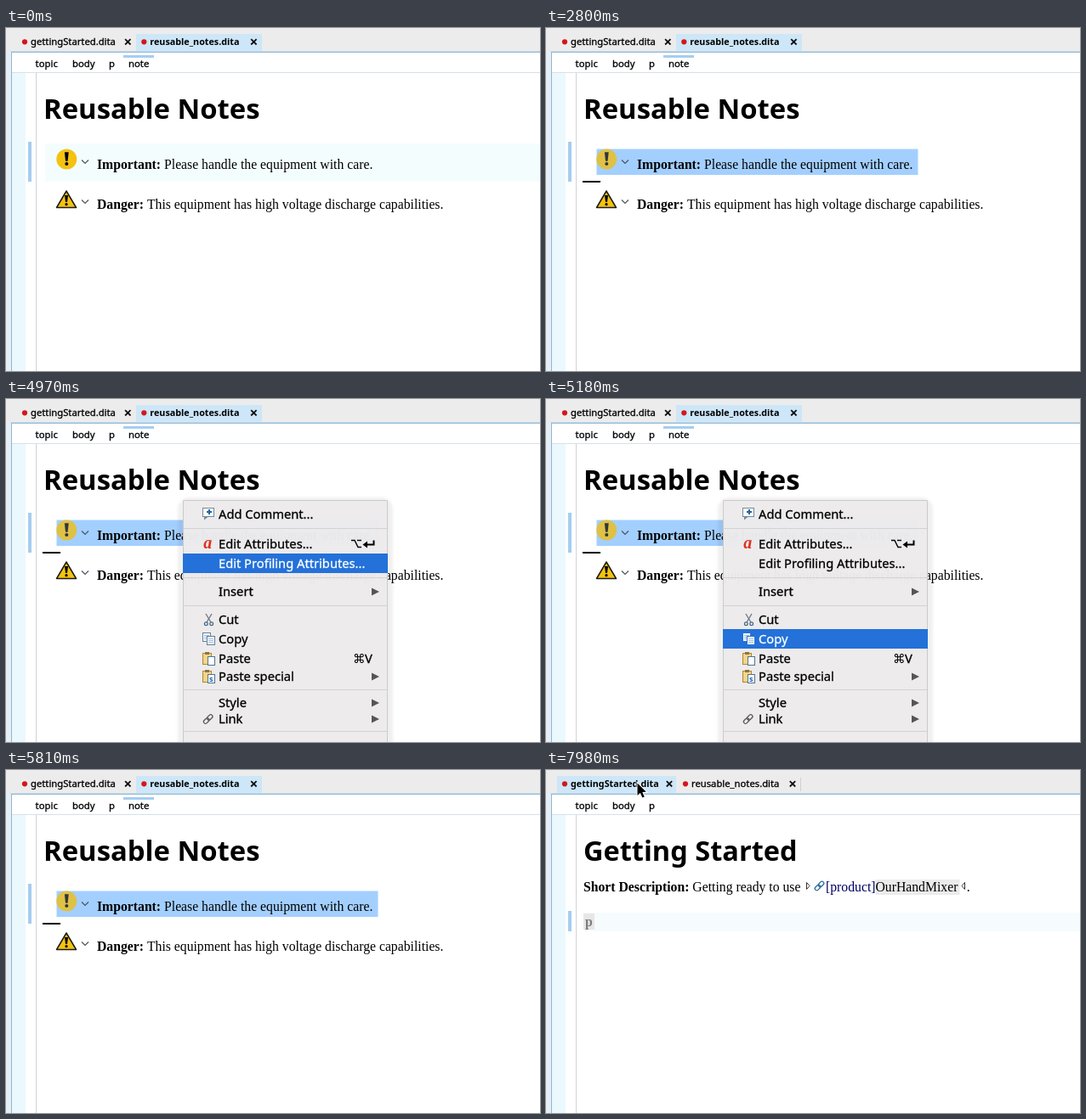
An HTML page with a canvas that plays this animation: 628 px wide and 404 px high, repeating every 8 s.

```html
<!DOCTYPE html>
<html lang="en">
<head>
<meta charset="utf-8">
<title>Reusable notes</title>
<style>
html, body { margin: 0; width: 100%; height: 100%; overflow: hidden; background: #fff; }
canvas { display: block; width: 628px; height: 404px; }
</style>
</head>
<body>
<canvas id="stage" width="628" height="404"></canvas>
<script>
const ctx = document.getElementById('stage').getContext('2d');
const LOOP = 8000;
const UI = '"Noto Sans", "Open Sans", sans-serif';
const SERIF = '"Liberation Serif", "Times New Roman", serif';
const BODY = 15.72;
const YELLOW = '#f5c211';

function rect(x, y, w, h, color) {
  ctx.fillStyle = color;
  ctx.fillRect(x, y, w, h);
}

function text(str, x, y, size, color = '#000', weight = 400, family = UI) {
  ctx.font = `${weight} ${size}px ${family}`;
  ctx.fillStyle = color;
  ctx.fillText(str, x, y);
  return x + ctx.measureText(str).width;
}

// Slightly heavier than regular weight
function label(str, x, y, size, color = '#000') {
  text(str, x, y, size, color);
  ctx.strokeStyle = color;
  ctx.lineWidth = 0.3;
  ctx.strokeText(str, x, y);
}

function serif(str, x, y, weight = 400, color = '#000') {
  return text(str, x, y, BODY, color, weight, SERIF);
}

function disc(x, y, r, color) {
  ctx.beginPath();
  ctx.arc(x, y, r, 0, Math.PI * 2);
  ctx.fillStyle = color;
  ctx.fill();
}

function trace(points) {
  ctx.beginPath();
  points.forEach(([x, y], i) => i ? ctx.lineTo(x, y) : ctx.moveTo(x, y));
}

function line(points, color, width = 1, closed = false) {
  trace(points);
  if (closed) ctx.closePath();
  ctx.strokeStyle = color;
  ctx.lineWidth = width;
  ctx.stroke();
}

function poly(points, color) {
  trace(points);
  ctx.closePath();
  ctx.fillStyle = color;
  ctx.fill();
}

function sheet(x, y, w, h, fill, edge) {
  rect(x, y, w, h, edge);
  rect(x + 1, y + 1, w - 2, h - 2, fill);
}

function cross(x, y) {
  line([[x - 3.2, y - 3.2], [x + 3.2, y + 3.2]], '#111', 1.8);
  line([[x + 3.2, y - 3.2], [x - 3.2, y + 3.2]], '#111', 1.8);
}

function pointer(x, y) {
  const shape = [[0, 0], [0, 14.5], [3.4, 11.4], [5.8, 17], [8.2, 16], [5.8, 10.6], [10.3, 10.3]]
    .map(([a, b]) => [x + a, y + b]);
  line(shape, '#fff', 2, true);
  poly(shape, '#000');
}

function link(x, y, color) {
  ctx.save();
  ctx.translate(x, y);
  ctx.rotate(-Math.PI / 4);
  ctx.strokeStyle = color;
  ctx.lineWidth = 1.3;
  for (const dx of [-6.5, -0.8]) {
    ctx.beginPath();
    ctx.roundRect(dx, -2.2, 7.3, 4.4, 2.2);
    ctx.stroke();
  }
  ctx.restore();
}

// ---- editor ----

function tab(name, x, closeX, active) {
  disc(x, 16.3, 3.1, '#d5161b');
  if (active) text(name, x + 7, 20, 10.75, '#000', 700);
  else label(name, x + 7, 20, 11.25);
  cross(closeX, 16.3);
}

function chrome(first) {
  rect(0, 0, 628, 404, '#fff');
  rect(0, 0, 628, 28, '#ececec');
  rect(0, 28, 6, 376, '#e6eff5');
  if (first) {
    rect(13, 7, 140, 20, '#cde6f8');
    rect(299, 9, 1, 16, '#cfcfcf');
  } else {
    rect(153, 7, 148, 20, '#cde6f8');
  }
  rect(5, 27, 623, 1, '#c4def0');
  rect(6, 28, 622, 1, '#93b5cf');
  rect(6, 28, 1, 376, '#93b5cf');
  rect(7, 52, 621, 1, '#d7e1e8');
  rect(7, 53, 16, 351, '#ebf9ff');
  rect(35, 53, 1, 351, '#cfd3d6');

  tab('gettingStarted.dita', 22, first ? 145 : 143.3, first);
  tab('reusable_notes.dita', first ? 164 : 162.3, first ? 290 : 291.4, !first);

  label('topic', 34.6, 46, 11.3);
  label('body', 78, 46, 11.3);
  label('p', 121, 46, 11.3);
  if (!first) {
    rect(138, 32, 36, 3, '#a5cdf1');
    label('note', 144, 46, 11.3);
  }
}

function bang(x, y, color) {
  poly([[x - 2.4, y - 8], [x + 2.4, y - 8], [x + 1.3, y + 2.5], [x - 1.3, y + 2.5]], color);
  disc(x, y + 5.6, 2, color);
}

function chevron(y) {
  line([[89, y - 2], [93, y + 2], [97, y - 2]], '#4b5560', 1.2);
}

function notes(selected, caret) {
  chrome(false);
  text('Reusable Notes', 44, 107, 32.85, '#000', 700);
  rect(26, 134, 4, 47, '#a5cdf1');
  if (selected) rect(59.5, 142.5, 378, 30.5, '#a3cfff');
  else rect(46, 136, 582, 45, '#f4fdfd');

  disc(71.3, 154.5, 12, selected ? '#dfc145' : YELLOW);
  bang(71.3, 154.3, selected ? '#30373b' : '#000');
  chevron(157.5);
  serif('Please handle the equipment with care.', serif('Important: ', 107, 166, 700), 166);

  const tri = [[71, 192], [82.5, 211.5], [59.5, 211.5]];
  ctx.lineJoin = 'round';
  poly(tri, YELLOW);
  line(tri, '#1a1a1a', 1.5, true);
  ctx.lineJoin = 'miter';
  poly([[69, 197], [73, 197], [72, 205], [70, 205]], '#000');
  disc(71, 207.7, 1.6, '#000');
  chevron(204.5);
  serif('This equipment has high voltage discharge capabilities.', serif('Danger: ', 107, 213, 700), 213);

  if (caret && selected) rect(43, 180, 21, 2, '#000');
  else if (caret) rect(305, 151, 2, 20, '#000');
}

function started() {
  chrome(true);
  text('Getting Started', 44, 107, 32.5, '#000', 700);
  rect(26, 166, 4, 24, '#a5cdf1');
  rect(45, 168, 583, 22, '#f6fcfd');
  serif('Getting ready to use', serif('Short Description: ', 44, 143, 700), 143);
  line([[306.5, 132.5], [310, 136.5], [306.5, 140.5]], '#333', 1, true);
  link(321.5, 136.5, '#2f6b9e');
  const x = serif('[product]', 329, 143, 400, '#000064');
  rect(x, 129, 99, 18, '#ebebeb');
  serif('OurHandMixer', x, 143);
  line([[492.5, 132.5], [489, 136.5], [492.5, 140.5]], '#333', 1, true);
  serif('.', 494.7, 143);
  rect(44, 169, 13, 19, '#e6e6e6');
  serif('p', 46, 184, 700, '#7d7d7d');
}

// ---- context menu ----

const icons = {
  comment(y) {
    sheet(231, y - 7.5, 14, 11, '#fff', '#76889a');
    poly([[233, y + 3], [238, y + 3], [233, y + 7]], '#76889a');
    rect(238, y - 5.5, 2, 6, '#1d65a5');
    rect(236, y - 3.5, 6, 2, '#1d65a5');
  },
  attribute(y) {
    text('a', 232.3, y + 5, 20, '#e0301e', 'italic 700', SERIF);
  },
  cut(y) {
    line([[235, y - 7], [241, y + 3]], '#6b7680', 1.3);
    line([[242, y - 7], [236, y + 3]], '#6b7680', 1.3);
    ctx.strokeStyle = '#44688a';
    ctx.lineWidth = 1.2;
    for (const x of [235.3, 241.7]) {
      ctx.beginPath();
      ctx.arc(x, y + 4.8, 1.9, 0, Math.PI * 2);
      ctx.stroke();
    }
  },
  copy(y, on) {
    const edge = on ? '#2672d9' : '#5f7f9f';
    for (const [x, dy] of [[231, -8], [236, -4]]) {
      sheet(x, y + dy, 10, 11, '#fff', edge);
      for (let i = 3; i < 9; i += 2) rect(x + 2, y + dy + i, 6, 1, '#a3bdd6');
    }
  },
  paste(y) {
    sheet(231, y - 7, 11, 14, '#f3d588', '#b3872f');
    rect(234, y - 8, 5, 3, '#8a7550');
    sheet(237, y - 3, 9, 11, '#fff', '#4f7598');
  },
  special(y) {
    icons.paste(y);
    text('s', 239, y + 6, 9, '#1d65b0', 700);
  },
  link(y) { link(237.7, y, '#5a5a5a'); }
};

const items = [
  { name: 'Add Comment...', y: 135.5, icon: 'comment' },
  { name: 'Edit Attributes...', y: 170.5, icon: 'attribute', key: 'enter' },
  { name: 'Edit Profiling Attributes...', y: 194 },
  { name: 'Insert', y: 227, sub: true },
  { name: 'Cut', y: 260, icon: 'cut' },
  { name: 'Copy', y: 283, icon: 'copy' },
  { name: 'Paste', y: 306, icon: 'paste', key: 'v' },
  { name: 'Paste special', y: 327, icon: 'special', sub: true },
  { name: 'Style', y: 358, sub: true },
  { name: 'Link', y: 377, icon: 'link', sub: true }
];

function shortcut(key, y, color) {
  if (key === 'v') {
    text('⌘', 408, y + 5, 14.5, color, 400, '"DejaVu Sans", sans-serif');
    label('V', 422, y + 5, 14.7, color);
    return;
  }
  line([[406, y - 4], [410, y - 4], [414, y + 4], [418, y + 4]], color, 1.4);
  line([[413, y - 4], [418, y - 4]], color, 1.4);
  line([[432.5, y - 4], [432.5, y + 1], [423, y + 1]], color, 2);
  poly([[419.5, y + 1], [425, y - 3], [425, y + 5]], color);
}

function menuShadow() {
  ctx.save();
  ctx.beginPath();
  ctx.rect(0, 29, 628, 375);
  ctx.rect(208, 119, 241, 285);
  ctx.clip('evenodd');
  ctx.filter = 'blur(1.5px)';
  ctx.beginPath();
  ctx.roundRect(202, 116, 253, 320, 14);
  ctx.fillStyle = 'rgba(0,0,0,.06)';
  ctx.fill();
  ctx.restore();
}

function menu(fade, blank, active) {
  ctx.save();
  ctx.globalAlpha = fade;
  menuShadow();
  ctx.globalAlpha = fade * 0.975;
  rect(209, 120, 239, 284, blank ? '#fff' : '#edebec');
  ctx.globalAlpha = fade;
  line([[208.5, 404], [208.5, 119.5], [448.5, 119.5], [448.5, 404]], '#cacaca');
  if (!blank) {
    for (const y of [152, 210, 243, 342, 391]) rect(209, y, 239, 1, '#d3d2d2');
    items.forEach((it, i) => {
      const on = i === active;
      const color = on ? '#fff' : '#000';
      if (on) rect(208, Math.round(it.y) - 12, 241, 23, '#2371d9');
      if (it.icon) icons[it.icon](it.y, on);
      label(it.name, 250, it.y + 5, 14.7, color);
      if (it.key) shortcut(it.key, it.y, color);
      if (it.sub) poly([[430, it.y - 4.5], [439, it.y], [430, it.y + 4.5]], on ? '#fff' : '#555');
    });
  }
  ctx.restore();
}

// ---- timeline ----

const within = (t, a, b) => t >= a && t < b;

function popup(t) {
  if (t < 4270) menu(0.85, true, -1);
  else if (t < 4340) menu(1, true, -1);
  else if (t < 4900) menu(1, false, -1);
  else if (t < 5670) menu(1, false, Math.min(5, 1 + Math.floor((t - 4900) / 70)));
  else menu(t < 5740 ? 0.6 : 0.25, false, 5);
}

function draw(t) {
  if (t >= 7560) {
    started();
    if (t >= 7980) pointer(107.5, 15.5);
    return;
  }
  const selected = t >= 2800;
  const caret = selected
    ? !within(t, 3220, 3780) && !within(t, 6860, 7070)
    : within(t, 1470, 1960) || t >= 2520;
  notes(selected, caret);
  if (within(t, 4200, 5810)) popup(t);
  if (within(t, 1890, 1960)) pointer(307.5, 155.5);
  if (within(t, 4760, 4900)) pointer(209.5, 159.5);
}

const start = performance.now();
function tick() {
  draw((performance.now() - start) % LOOP);
  requestAnimationFrame(tick);
}
tick();
</script>
</body>
</html>
```
